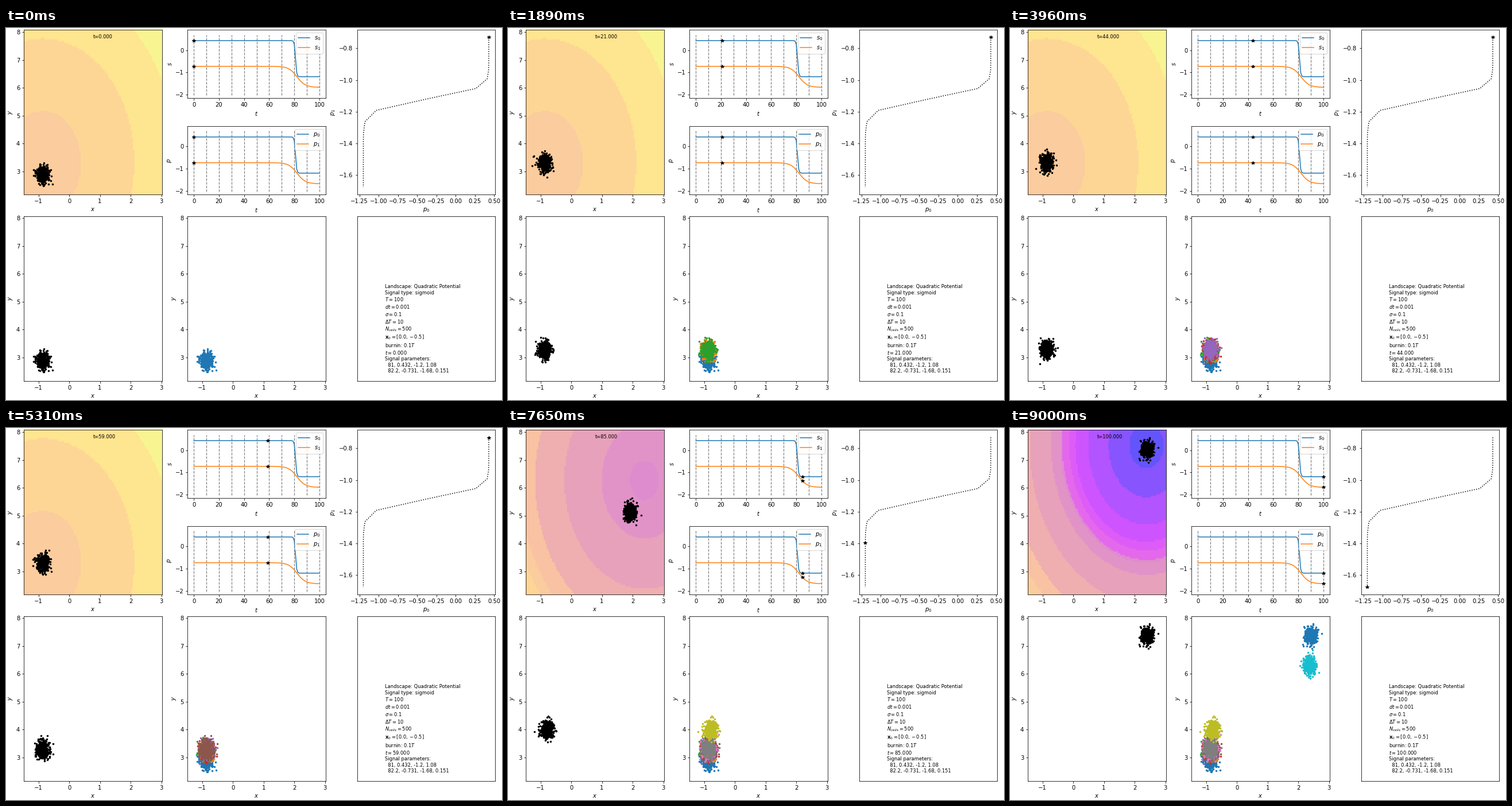
A matplotlib script for the animation above (9.09 s loop, 864 by 648 pixels).

```python
import numpy as np
import matplotlib.pyplot as plt
from matplotlib.animation import FuncAnimation

W, H = 864, 648
T, SNAP = 100, 10
N_CELLS, SIGMA, DT = 500, 0.1, 0.02
STIFF = np.array([1 / 2, 2 / 9])
XLIM, YLIM = (-1.473, 3.022), (2.163, 8.076)

# Signal parameters: switch time, start, end, rate
SIG = ((81, 0.432, -1.2, 1.08), (82.2, -0.731, -1.68, 0.151))

# Potential levels and the colour of each band between them
LEVELS = [-7.68, -7.37, -6.85, -6.4, -6.15, -5.85, -5.76, -5.32,
          -4.1, -2.6, -1.64, -1.0, 0.85, 3.4]
BANDS = np.array([
    (100, 84, 251), (135, 84, 253), (178, 84, 255), (206, 84, 255),
    (221, 92, 248), (228, 104, 236), (222, 140, 205), (225, 147, 200),
    (231, 161, 187), (239, 174, 175), (249, 194, 163), (251, 204, 158),
    (253, 214, 150), (254, 229, 143), (248, 244, 146)], dtype=np.uint8)


def signal(t):
    return np.array([a + (b - a) / 2 * (1 + np.tanh(r * (t - tc)))
                     for tc, a, b, r in SIG])


def simulate():
    """Cell positions at every whole time, after a burn-in of 0.1 T."""
    rng = np.random.default_rng(4)
    pos = np.tile([0.0, -0.5], (N_CELLS, 1))
    per_unit = round(1 / DT)
    out = []
    for k in range(-T // 10 * per_unit, T * per_unit + 1):
        if k >= 0 and k % per_unit == 0:
            out.append(pos.copy())
        drift = -(STIFF * pos + signal(max(k * DT, 0)))
        pos += drift * DT + SIGMA * np.sqrt(DT) * rng.standard_normal(pos.shape)
    return out


def add_axes(x, top, bottom):
    return fig.add_axes([x / W, 1 - bottom / H, 240.4 / W, (bottom - top) / H])


def label(ax, x, y):
    ax.set_xlabel(f"${x}$")
    ax.set_ylabel(f"${y}$")


def plane(x, top, bottom):
    ax = add_axes(x, top, bottom)
    ax.set(xlim=XLIM, ylim=YLIM, xticks=range(-1, 4), yticks=range(3, 9))
    label(ax, "x", "y")
    return ax


def dots(ax, color):
    return ax.plot([], [], ".", color=color, ms=5)[0]


def signal_plot(top, bottom, name):
    ax = add_axes(316.4, top, bottom)
    for i in range(2):
        ax.plot(times, path[i], label=f"${name}_{i}$")
    ax.vlines(range(0, T + 1, SNAP), -2.03, 0.7, color="gray", ls="--",
              lw=1.2, zorder=1)
    ax.set(xlim=(-5, 105), ylim=(-2.17, 0.914),
           xticks=range(0, 101, 20), yticks=(-2, -1, 0))
    label(ax, "t", name)
    ax.legend(loc="upper right")
    return ax.plot([], [], "k*", zorder=4)[0]


def info(t):
    rows = ["  " + ", ".join(f"{v:g}" for v in row) for row in SIG]
    return "\n".join([
        "Landscape: Quadratic Potential",
        "Signal type: sigmoid",
        "$T=100$",
        "$dt=0.001$",
        r"$\sigma=0.1$",
        r"$\Delta T=10$",
        "$N_{cells}=500$",
        r"$\mathbf{x}_0=[0.0, -0.5]$",
        "burnin: $0.1T$",
        f"$t={t:.3f}$",
        "Signal parameters:", *rows])


cells = simulate()
times = np.arange(T + 1)
path = signal(times)
gx, gy = np.meshgrid(np.linspace(*XLIM, 100), np.linspace(*YLIM, 100))


def landscape(p):
    phi = gx**2 / 4 + gy**2 / 9 + p[0] * gx + p[1] * gy
    return BANDS[np.digitize(phi, LEVELS)]


fig = plt.figure(figsize=(W / 72, H / 72), dpi=72, facecolor="white")

live_ax = plane(31.3, 3.4, 290.2)
image = live_ax.imshow(landscape(path[:, 0]), extent=(*XLIM, *YLIM),
                       origin="lower", aspect="auto",
                       interpolation="nearest")
live = dots(live_ax, "k")
clock = live_ax.text(0.5, 0.95, "", fontsize="small",
                     transform=live_ax.transAxes)

stars = [signal_plot(3.4, 122.2, "s"), signal_plot(171.2, 290.2, "p")]

phase_ax = add_axes(611.5, 3.4, 290.2)
phase_ax.plot(*path, "k:")
phase_ax.set(xticks=np.arange(-1.25, 0.6, 0.25),
             yticks=np.arange(-8, -17, -2) / 10,
             xlim=(-1.2816, 0.5136), ylim=(-1.7229, -0.6838))
label(phase_ax, "p_0", "p_1")
phase_star = phase_ax.plot([], [], "k*")[0]

last = dots(plane(31.3, 327.8, 614.5), "k")
history_ax = plane(316.4, 327.8, 614.5)
history = [dots(history_ax, f"C{i % 10}") for i in range(T // SNAP + 1)]

info_ax = add_axes(611.5, 327.8, 614.5)
info_ax.set(xticks=[], yticks=[])
note = info_ax.text(0.2, 0.05, "", fontsize="small",
                    transform=info_ax.transAxes)


def update(t):
    p = path[:, t]
    image.set_data(landscape(p))
    live.set_data(*cells[t].T)
    clock.set_text(f"t={t:.3f}")
    note.set_text(info(t))
    for star in stars:
        star.set_data([t, t], p)
    phase_star.set_data(p[:1], p[1:])
    last.set_data(*cells[t - t % SNAP].T)
    for i, layer in enumerate(history):
        shown = cells[i * SNAP] if i * SNAP <= t else np.empty((0, 2))
        layer.set_data(*shown.T)
    return []


anim = FuncAnimation(fig, update, frames=T + 1, interval=90,
                     repeat=True, repeat_delay=0)
plt.show()
```
